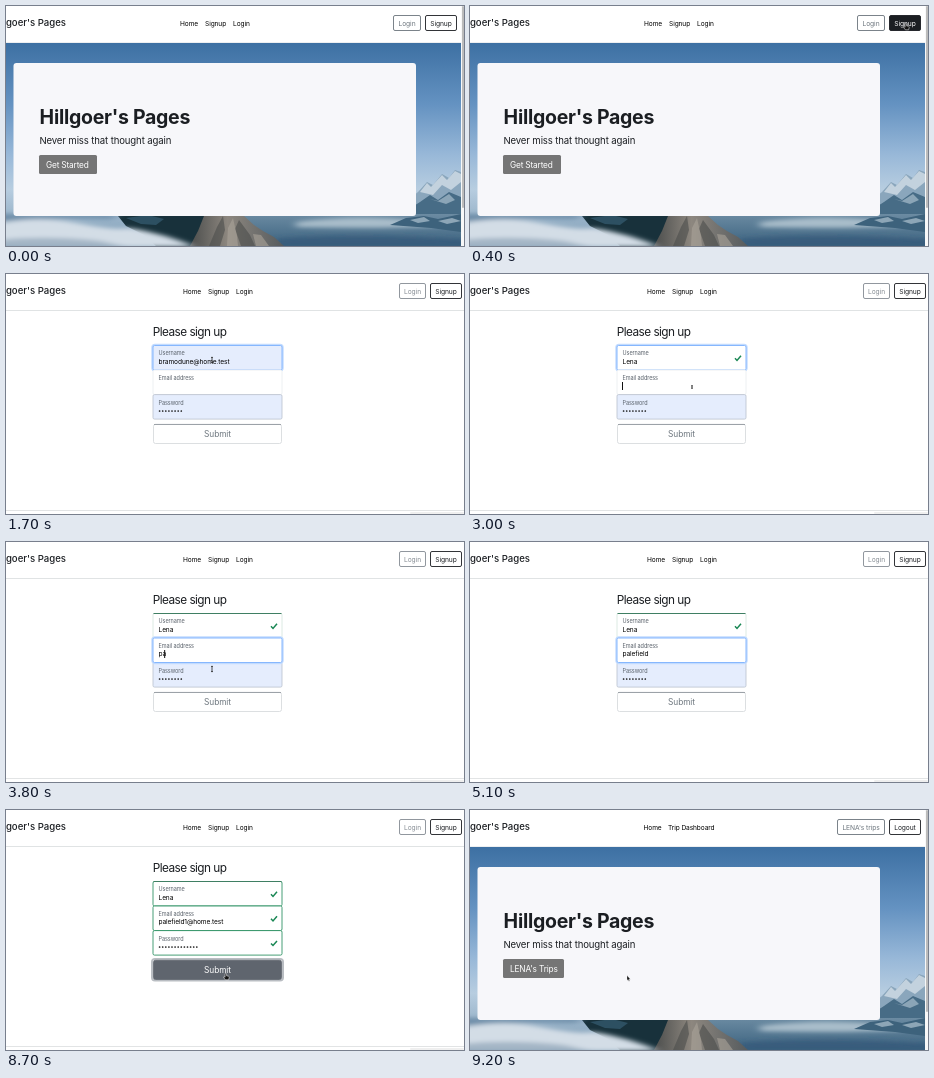
These frames come from a looping animation (458 by 240 pixels, 9300 ms). An HTML page:

```html
<!DOCTYPE html>
<html lang="en">
<head>
<meta charset="utf-8">
<title>Sign up</title>
<style>
html, body { margin: 0; width: 100%; height: 100%; overflow: hidden; background: #fff; }
svg { display: block; width: 100%; height: 100%; }
text { font-family: Inter, Roboto, "Liberation Sans", sans-serif; white-space: pre; }
</style>
</head>
<body>
<svg viewBox="0 0 458 240" preserveAspectRatio="none">
  <defs>
    <linearGradient id="sky" x1="0" y1="0" x2="0" y2="1">
      <stop offset="0" stop-color="#3d70a3"/>
      <stop offset=".3" stop-color="#6492c1"/>
      <stop offset=".55" stop-color="#98b8d8"/>
      <stop offset=".72" stop-color="#b7cde0"/>
      <stop offset="1" stop-color="#7d9bb3"/>
    </linearGradient>
    <linearGradient id="sea" x1="0" y1="0" x2="0" y2="1">
      <stop offset="0" stop-color="#6b8ba2"/>
      <stop offset="1" stop-color="#3c627f"/>
    </linearGradient>
    <linearGradient id="rock" x1="0" y1="0" x2="1" y2="0">
      <stop offset="0" stop-color="#4b4d4c"/>
      <stop offset=".4" stop-color="#8d877f"/>
      <stop offset="1" stop-color="#565b5e"/>
    </linearGradient>
    <filter id="soft" x="-20%" y="-80%" width="140%" height="260%"><feGaussianBlur stdDeviation="4 2"/></filter>
    <clipPath id="photo"><rect y="37" width="455" height="203"/></clipPath>
  </defs>
  <g id="stage"></g>
</svg>
<script>
const LOOP = 9300, STEP = 100;
const BRAND = "Hillgoer's Pages", NAME = "Lena";
const SAVED = "bramodune@home.test", EMAIL = "palefield1@home.test";
const INK = "#1b1e22", GREY = "#6c757d", GREEN = "#198754", BLUE = "#86b7fe";
const stage = document.getElementById("stage");

const rect = (x, y, w, h, fill, more = "") =>
  `<rect x="${x}" y="${y}" width="${w}" height="${h}" fill="${fill}" ${more}/>`;
const path = (d, fill, more = "") => `<path d="${d}" fill="${fill}" ${more}/>`;
const text = (x, y, size, str, fill = INK, spacing = 0, more = "") =>
  `<text x="${x}" y="${y}" font-size="${size}" fill="${fill}" letter-spacing="${spacing}" ${more}>${str}</text>`;
const mid = 'text-anchor="middle"';
const within = (t, a, b) => t >= a && t < b;

// Number of keys pressed by time t
const typed = (t, keys) => keys.filter(k => t >= k).length;

const EMAIL_KEYS = [3700, 3800, 4000, 4100, 4300, 4400, 4600, 4800, 4900, 5300,
  5400, 5400, 5500, 5600, 5800, 5900, 6000, 6100, 6200, 6200];
const NAME_KEYS = [2400, 2500, 2600, 2700];

// Pointer stops: time, x, y
const POINTER = [
  [0, 168, 134], [100, 168, 134], [400, 436, 20], [1000, 436, 20],
  [1600, 206, 86], [2700, 206, 86], [2900, 222, 113], [3100, 222, 113],
  [3500, 206, 127], [6100, 206, 127], [6500, 196, 134], [8400, 196, 134],
  [8600, 220, 166], [8900, 220, 166], [9200, 157, 167], [LOOP, 157, 167]
];

function pointerAt(t) {
  const i = Math.max(1, POINTER.findIndex(p => p[0] >= t));
  const [t0, x0, y0] = POINTER[i - 1], [t1, x1, y1] = POINTER[i];
  const u = (t - t0) / (t1 - t0), e = u * u * (3 - 2 * u);
  return [x0 + (x1 - x0) * e, y0 + (y1 - y0) * e];
}

function pointer(t) {
  const hidden = t < 100 || within(t, 2100, 2700) || within(t, 4100, 6100) || within(t, 7200, 8500);
  if (hidden) return "";
  const [x, y] = pointerAt(t);
  const at = `transform="translate(${x} ${y})"`;
  if (within(t, 400, 1100) || within(t, 8600, 8900))
    return path("M-.9 -2.2q.8 -.8 1.5 0v2l2 .5q.8 .3 .6 1.2l-.6 2.3h-3.2l-2 -2.6q.2 -1 1.7 0z",
      "#111", `${at} stroke="#fff" stroke-width=".5"`);
  if (within(t, 1500, 8600)) {
    const h = within(t, 2700, 3100) ? 1.2 : 2.6;
    return path(`M-1 ${-h}h2M0 ${-h}v${2 * h}M-1 ${h}h2`, "none", `${at} stroke="#222" stroke-width=".8"`);
  }
  return path("M0 -1.5v5l1.1 -1 .8 1.8 .8 -.4 -.8 -1.7h1.5z", "#111", `${at} stroke="#fff" stroke-width=".3"`);
}

function button(x, w, label, color, dark, ring) {
  const halo = ring ? rect(x - 1, 8, w + 2, 18, "none", 'rx="3" stroke="#a4a7ab" stroke-width="2"') : "";
  return halo + rect(x + .5, 9.5, w - 1, 15, dark ? INK : "#fff", `rx="1.5" stroke="${color}" stroke-width=".9"`) +
    text(x + w / 2, 19.8, 6.7, label, dark ? "#fff" : color, -.1, mid);
}

const brand = () => text(60, 20.1, 9.6, BRAND, INK, 0, 'text-anchor="end" font-weight="500"');
const link = (x, label) => text(x, 19.8, 6.6, label, "#000", -.1);

const landscape = () => `<g clip-path="url(#photo)">` +
  rect(0, 37, 455, 203, "url(#sky)") +
  // far peaks
  path("M400 196L412 186 421 176 427 179 436 168 443 172 449 164 455 166V210H400z", "#8aa6bc") +
  path("M414 186L421 177 425 181 436 169 441 174 449 165 455 168V176L445 184 436 179 427 189z", "#c3d2de") +
  path("M400 205L414 196 424 189 432 194 443 186 455 191V216H400z", "#476c86") +
  path("M424 193L432 195 443 188 449 194 440 198z", "#8ba5b7") +
  // sea
  rect(230, 208, 225, 32, "url(#sea)") +
  `<g filter="url(#soft)">` +
  path("M290 216Q350 208 410 214L440 220Q370 223 290 221z", "#a9bdca") +
  path("M270 233Q350 226 465 234V240H270z", "#33587a", 'opacity=".7"') + `</g>` +
  path("M384 219L400 212 418 210 432 213 455 208V226L425 222z", "#3d627c") +
  path("M404 214L418 211 424 215 412 217zM432 215L446 212 455 215 441 218z", "#8da6b7") +
  // dark slope and lit cliff
  path("M112 210H215V240H150L138 229 120 220z", "#18313b") +
  path("M120 212L142 209 158 213 150 219 135 218z", "#2d5062") +
  path("M184 240L192 225 198 210H238L248 219 257 225 268 231 278 240z", "url(#rock)") +
  path("M203 240L211 221 217 210 219 224 214 240zM235 240L229 223 233 214 244 229 249 240z", "#4c4d4c", 'opacity=".6"') +
  path("M221 240L222 222 227 212 231 230 232 240zM250 240L247 228 255 229 263 240z", "#aaa399", 'opacity=".6"') +
  // clouds
  `<g filter="url(#soft)">` +
  path("M-10 208H115L105 213Q50 211 -10 216z", "#6e8ea9") +
  path("M-10 218Q30 209 70 217T124 222Q160 228 190 241H-10z", "#d3dde6") +
  path("M-10 234Q40 229 95 235L120 241H-10z", "#a4b6c6") + `</g></g>`;

function home(t, member) {
  const hover = !member && within(t, 400, 500);
  const nav = member
    ? link(173.5, "Home") + link(198, "Trip Dashboard") +
      button(367, 48, `${NAME.toUpperCase()}'s trips`, GREY) + button(419, 32, "Logout", INK)
    : link(174, "Home") + link(199, "Signup") + link(227, "Login") +
      button(387, 28, "Login", GREY) + button(419, 32, "Signup", INK, hover);
  const label = member ? `${NAME.toUpperCase()}'s Trips` : "Get Started";
  return landscape() + rect(0, 0, 455, 37, "#fff") + rect(0, 36.4, 455, .6, "#e2e5e8") + brand() + nav +
    rect(455, 0, 3, 240, "#f8f8f8") + rect(456, 0, 2, 202, "#bcbcbc", 'rx="1"') +
    rect(7.5, 57, 402.5, 153, "#f7f7fa", 'rx="3"') +
    text(33.6, 118, 19.5, BRAND, INK, -.27, 'font-weight="700"') +
    text(33.4, 137.8, 9.6, "Never miss that thought again", INK, -.13) +
    rect(33, 149, member ? 61 : 58, 19, "#757575", 'rx="1.5"') +
    text(40, 161.8, 8.3, label, "#fff", -.18);
}

function field(y, label, { filled, focus, glow = 1, valid, settled, first }) {
  const fill = filled ? "#e5edfd" : "#fff";
  const line = focus ? BLUE : settled ? GREEN : valid ? "#d3e5dc" : filled ? "#b9c1cd" : "#e9ecef";
  const halo = focus
    ? rect(146.5, y - .5, 130, 25.5, "none", `rx="2.5" stroke="#c2dbfe" stroke-width="2.4" opacity="${glow}"`) : "";
  const top = first && !focus ? rect(147.5, y - .5, 128, 1, valid ? "#3f7f63" : "#9aa1aa") : "";
  const tick = valid
    ? path(`M265 ${y + 12.8}l2 2.1 4 -4.6`, "none", `stroke="${GREEN}" stroke-width="1.5"`) : "";
  return halo + rect(147, y, 129, 24.5, fill, `stroke="${line}" stroke-width="${focus ? 1 : .8}" rx="1.5"`) +
    top + tick + text(152.5, y + 9.9, 5.5, label, "#59616a", -.06);
}

const value = (y, str) => text(152.5, y, 6.6, str, "#000", -.1);
const caret = (x, y) => rect(x, y, 1, 8, "#111");
const dots = (n, x, y, step, r, fill) =>
  Array.from({ length: n }, (_, i) => `<circle cx="${x + i * step}" cy="${y}" r="${r}" fill="${fill}"/>`).join("");

function popup(x, y, names) {
  const rows = names.length, h = 16 + rows * 20.3;
  let s = path(`M${x + 4} ${y + .5}l3 -3 3 3z`, "#111317") + rect(x, y, 75, h, "#111317", 'rx="2"');
  names.forEach((n, i) => {
    const top = y + i * 20.3;
    s += rect(x + 4.5, top + 7, 5, 4, "#050607", 'rx="1"') +
      text(x + 14, top + 8.9, 4.8, n, "#fff", -.03, 'font-weight="600"') +
      dots(8, x + 15, top + 14.3, 2, .55, "#ccc");
  });
  const foot = y + rows * 20.3 + 8.4;
  return s + `<circle cx="${x + 7.5}" cy="${foot}" r="1.9" fill="none" stroke="#eee" stroke-width="1"/>` +
    text(x + 15, foot + 1.8, 4.8, "Manage passwords...", "#e2e2e2", -.05) +
    text(x + 64, foot + 1.4, 3.8, "dev", "#999");
}

function submit(hot) {
  const shape = (fill, line) => rect(147.5, 150.3, 128, 19.2, fill, `rx="2" stroke="${line}" stroke-width=".8"`);
  const body = hot
    ? rect(146, 149, 131, 21.6, "none", 'rx="3" stroke="#b9bdc2" stroke-width="2"') + shape("#5f656e", "#5f656e")
    : shape("#fff", "#d3d7da") + rect(148, 150, 127, .8, "#8b9299");
  return body + text(211.5, 163, 8.3, "Submit", hot ? "#fff" : GREY, -.08, mid);
}

function form(t) {
  const nameLen = typed(t, NAME_KEYS), mailLen = typed(t, EMAIL_KEYS);
  const nameFocus = within(t, 1700, 3200), mailFocus = within(t, 3100, 6600), passFocus = within(t, 6600, 8600);
  const nameOld = t < 2100, settled = t >= 8600;
  const passLen = t < 7200 ? 8 : Math.min(13, 1 + Math.max(0, Math.floor((t - 7400) / 75) + 1));
  const more = [SAVED, "bramodune", "dunebram@home.test"];

  const nameBox = field(71.5, "Username",
    { filled: nameOld, focus: nameFocus, glow: t === 3100 ? .4 : 1, valid: t >= 2800, settled, first: true });
  const mailBox = field(96, "Email address", { focus: mailFocus, valid: t >= 6600, settled });
  const passBox = field(120.6, "Password", { filled: t < 7300, focus: passFocus, valid: t >= 7900, settled });

  let s = rect(0, 36.2, 458, .8, "#d9dcde") + rect(0, 236.2, 458, .7, "#d6d9da") +
    rect(404, 238, 54, 2, "#efefef", 'rx="1"') + brand() +
    link(177, "Home") + link(202, "Signup") + link(230, "Login") + button(393, 27, "Login", "#858c93") +
    button(424, 32, "Signup", INK, t < 1100, t < 1700) +
    text(146.8, 61.8, 11.8, "Please sign up", INK, -.55) + submit(settled);

  // The focused field lies over its neighbours
  s += mailFocus ? nameBox + passBox + mailBox : nameBox + mailBox + passBox;

  if (within(t, 1900, 2100)) s += rect(152, 83.5, 73, 8.2, "#b3d4fd");
  s += value(90, nameOld ? SAVED : NAME.slice(0, nameLen));
  if (within(t, 2100, 2800)) s += caret(152.6 + nameLen * 3.45, 83.5);

  s += value(114.4, EMAIL.slice(0, mailLen));
  const caretOn = t < 3700 ? t % 1000 < 500 : !within(t, 5100, 5300);
  if (within(t, 3000, 6500) && caretOn) s += caret(152 + mailLen * (mailLen > 9 ? 3.3 : 3.08), 108);

  if (within(t, 6800, 7200)) s += rect(152, 132.5, 25, 7.4, "#8fbcf4");
  s += dots(passLen, 153.6, 137, 3.1, .85, "#111");
  if (within(t, 7200, 8300) && passLen < 13) s += caret(153 + passLen * 3.1, 132.5);

  if (within(t, 1800, 2100)) s += popup(181, 99, [SAVED]);
  if (within(t, 2100, 2400)) s += popup(181, 99, more);
  if (within(t, 3200, 3800)) s += popup(189, 124, more);
  if (within(t, 6800, 7200)) s += popup(181, 148, [SAVED]);
  return s;
}

function scene(t) {
  const page = t < 500 ? home(t, false) : t < 8900 ? form(t) : home(t, true);
  return rect(0, 0, 458, 240, "#fff") + page + pointer(t);
}

let shown = -1;
const start = performance.now();
function tick() {
  const t = Math.floor((performance.now() - start) % LOOP / STEP) * STEP;
  if (t !== shown) stage.innerHTML = scene(shown = t);
  requestAnimationFrame(tick);
}
tick();
</script>
</body>
</html>
```
